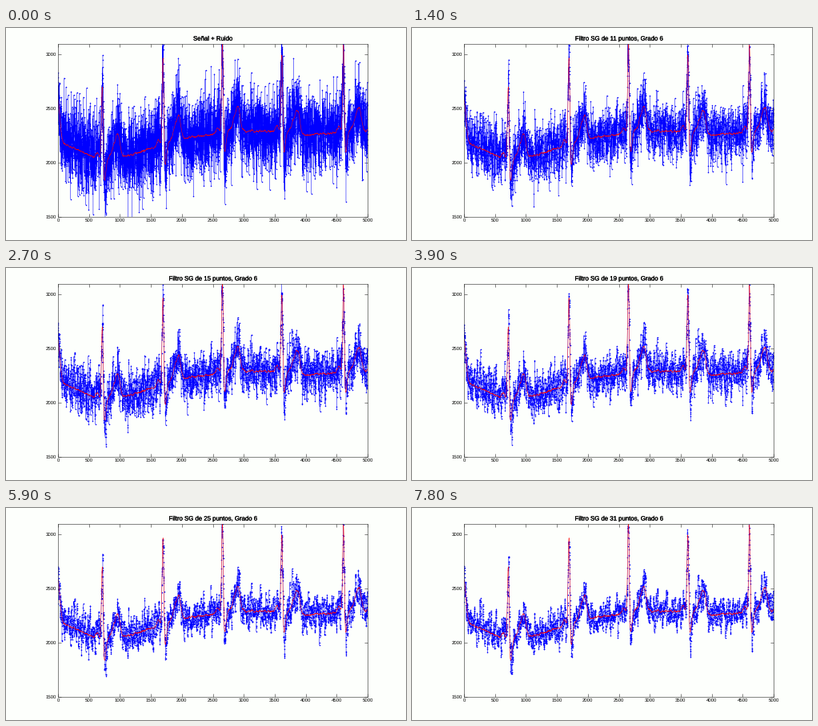
A matplotlib script for the animation above (8 s loop, 500x266 px).

```python
import numpy as np
import matplotlib.pyplot as plt
from matplotlib.animation import FuncAnimation
from matplotlib.patheffects import Normal, Stroke

plt.rcParams.update({"font.family": "Liberation Sans",
                     "path.simplify": False,
                     "text.hinting": "none"})

W, H, DPI = 500, 266, 100
PX = 72 / DPI
STEP_MS, LOOP_MS = 100, 8000
FIRST_MS, HOLD_MS = 100, 640
DEGREE = 6
PAPER = "#fdfffc"

x = np.arange(5001)
rng = np.random.default_rng(11)


def bump(center, height, left, right=None):
    """Gaussian with separate widths on each side."""
    d = x - center
    width = np.where(d < 0, left, right or left)
    return height * np.exp(-0.5 * (d / width) ** 2)


def heartbeat_signal():
    drift = [(0, 2195), (700, 2020), (1050, 2050), (2050, 2225),
             (2900, 2290), (3500, 2290), (4000, 2255), (5000, 2295)]
    y = np.interp(x, *zip(*drift)) + 380 * np.exp(-(x / 45) ** 2)
    beats = [(715, 680), (1695, 810), (2655, 840), (3615, 710), (4610, 810)]
    for r, height in beats:
        y += bump(r - 75, 55, 25)        # P
        y += bump(r, height, 13)         # R
        y += bump(r + 34, -200, 13, 22)  # S
        y += bump(r + 255, 220, 65, 32)  # T
    wobble = np.convolve(rng.normal(0, 1, x.size), np.ones(25) / 5, "same")
    return y + 5 * wobble


def savgol(y, points):
    """Savitzky-Golay smoothing with polynomial fits at both ends."""
    m = points // 2
    v = np.vander(np.arange(-m, m + 1) / m, DEGREE + 1)
    proj = v @ np.linalg.pinv(v)
    out = np.convolve(y, proj[m][::-1], mode="same")
    out[:m] = proj[:m] @ y[:points]
    out[-m:] = proj[m + 1:] @ y[-points:]
    return out


clean = heartbeat_signal()
noisy = clean + rng.normal(0, 185, x.size)

starts = [round((FIRST_MS + HOLD_MS * k) / STEP_MS) for k in range(13)]
windows = [7 + 2 * k for k in range(len(starts))]
curves = [noisy] + [savgol(noisy, n) for n in windows]
titles = ["Señal + Ruido"] + [
    f"Filtro SG de {n} puntos, Grado {DEGREE}" for n in windows]

fig = plt.figure(figsize=(W / DPI, H / DPI), dpi=DPI, facecolor=PAPER)
ax = fig.add_axes([65 / W, 29.5 / H, 387 / W, 217 / H], facecolor=PAPER)
ax.set(xlim=(0, 5000), ylim=(1500, 3100),
       xticks=range(0, 5001, 500), yticks=range(1500, 3001, 500))
ax.tick_params(direction="in", top=True, right=True, length=4 * PX,
               width=0.6 * PX, color="#333333", labelsize=6 * PX,
               pad=2 * PX)
for spine in ax.spines.values():
    spine.set(linewidth=0.6 * PX, edgecolor="#333333")

blue, = ax.plot(x, noisy, "o-", color="#0000ff", lw=0.26 * PX,
                ms=1.6 * PX, mew=0)
ax.plot(x, clean, color="#ff0000", lw=0.5 * PX)
title = fig.text(258.5 / W, 1 - 15.6 / H, "", ha="center", va="baseline",
                 fontsize=7.8 * PX)
title.set_path_effects([Stroke(linewidth=0.2, foreground="black"), Normal()])


def update(i):
    k = np.searchsorted(starts, i, side="right")
    blue.set_ydata(curves[k])
    title.set_text(titles[k])
    return blue, title


anim = FuncAnimation(fig, update, frames=LOOP_MS // STEP_MS,
                     interval=STEP_MS, repeat=True, repeat_delay=0)
plt.show()
```
